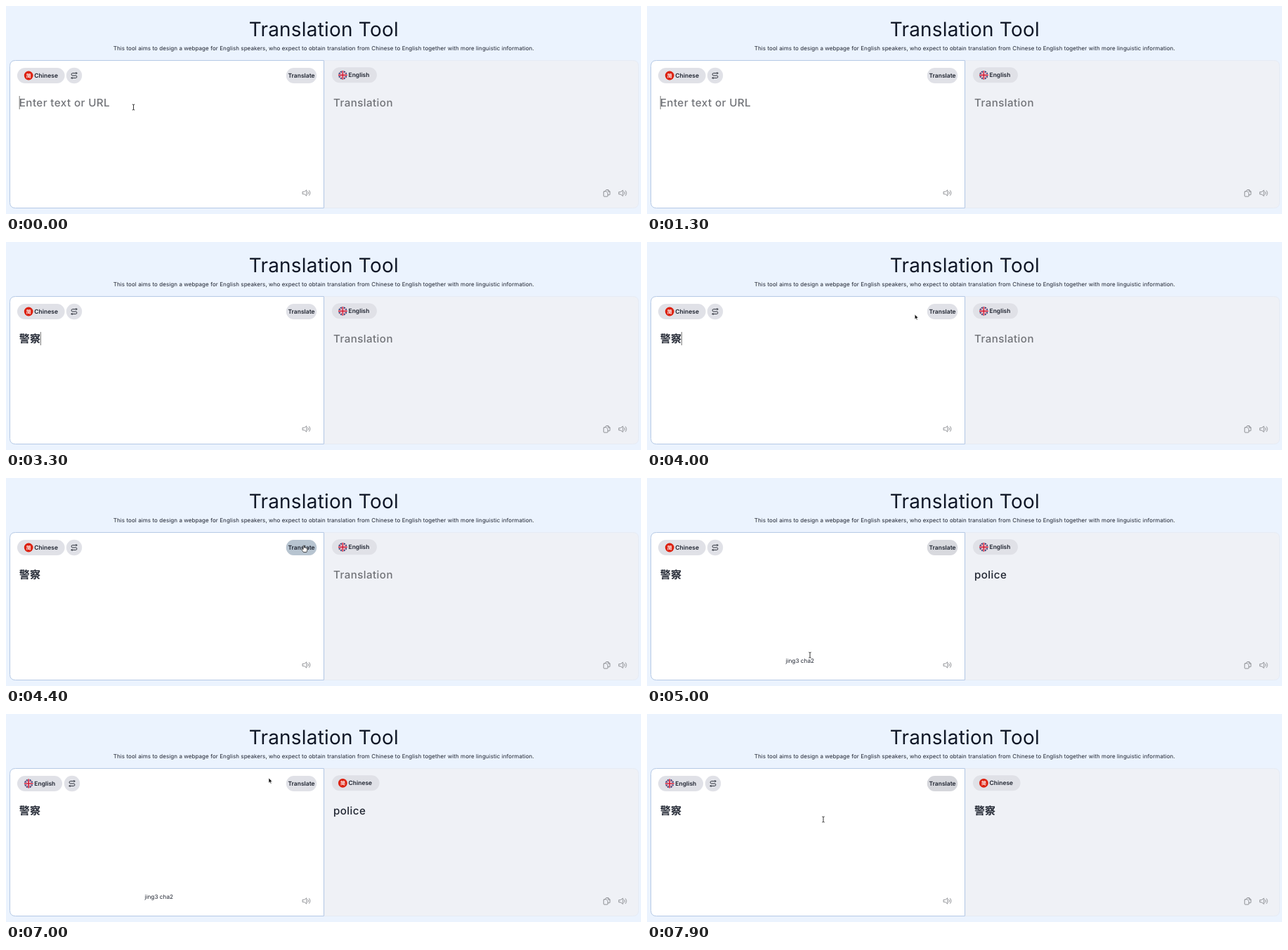
Write an HTML page that moves like this. It is 904x296 px and loops after 8 s.

```html
<!DOCTYPE html>
<html lang="en">
<head>
<meta charset="utf-8">
<title>Translation Tool</title>
<style>
  html, body { margin: 0; width: 100%; height: 100%; overflow: hidden; background: #ebf3fe; }
  svg { display: block; width: 100%; height: 100%; }
  text {
    font-family: Inter, "Noto Sans CJK SC", "Noto Sans CJK", sans-serif;
    font-optical-sizing: none;
    text-rendering: geometricPrecision;
    white-space: pre;
    fill: #1f2430;
  }
  .title { font-size: 28px; letter-spacing: .2px; text-anchor: middle; fill: #111827; }
  .sub { font-size: 8px; letter-spacing: .075px; text-anchor: middle; }
  .btn { font-size: 8.5px; font-weight: 600; }
  .field { font-size: 15.2px; font-weight: 500; letter-spacing: .4px; }
  .field.han { font-size: 15px; font-weight: 600; letter-spacing: .1px; }
  .field.hint { fill: #717378; }
  .pinyin { font-size: 8.2px; letter-spacing: .04px; }
  .cand { font-size: 8.2px; }
  .num { font-size: 6.3px; fill: #777; }
  .on { fill: #fff; }
  .pill { fill: #e0e1e7; }
  .line { fill: none; stroke: #85878c; stroke-width: .9; stroke-linecap: round; stroke-linejoin: round; }
</style>
</head>
<body>
<svg viewBox="0 0 904 296" xmlns="http://www.w3.org/2000/svg">
  <defs>
    <clipPath id="round"><circle r="6.4"/></clipPath>
    <filter id="shade" x="-10%" y="-80%" width="120%" height="300%">
      <feDropShadow dx="0" dy="2" stdDeviation="2.8" flood-color="#000" flood-opacity=".35"/>
    </filter>
    <g id="English">
      <g clip-path="url(#round)">
        <circle r="6.4" fill="#1d2b6b"/>
        <path d="M-6-6 6 6M6-6-6 6" stroke="#fff" stroke-width="1.7"/>
        <path d="M-6-6 6 6M6-6-6 6" stroke="#cf1b35" stroke-width=".7"/>
        <path d="M0-7V7M-7 0H7" stroke="#fff" stroke-width="3"/>
        <path d="M0-7V7M-7 0H7" stroke="#cf1b35" stroke-width="1.7"/>
      </g>
      <text class="btn" x="8.1" y="3">English</text>
    </g>
    <g id="Chinese">
      <circle r="6.4" fill="#dc2110"/>
      <text x="0" y="2.6" text-anchor="middle" style="font-size:7px;font-weight:700;fill:#fff">简</text>
      <text class="btn" x="8.1" y="3">Chinese</text>
    </g>
    <g id="speaker" class="line">
      <path d="M-5-1.6h2.2L.4-4.2V4.2L-2.8 1.6H-5zM2.4-1.8a2.6 2.6 0 0 1 0 3.6M4.1-3.5a5 5 0 0 1 0 7"/>
    </g>
    <g id="ibeam" fill="none">
      <path d="M-1.7-4Q0-4 0-3V3Q0 4-1.7 4M1.7-4Q0-4 0-3M0 3Q0 4 1.7 4" stroke="#fff" stroke-width="1.8" opacity=".7"/>
      <path d="M-1.7-4Q0-4 0-3V3Q0 4-1.7 4M1.7-4Q0-4 0-3M0 3Q0 4 1.7 4" stroke="#222" stroke-width=".9"/>
    </g>
    <path id="arrow" d="M0 0V7.2L1.7 5.7 2.8 8.2 4 7.7 2.9 5.2H5.1Z" fill="#111" stroke="#fff" stroke-width=".6"/>
    <path id="hand" d="M-.9 5V.8a.8.8 0 0 1 1.6 0V3.2q1-.5 1.5.2 1-.3 1.4.4 1.2-.1 1.2 1V6.8Q4.6 8.1 3.8 9.6H-.5Q-1.4 8.2-3 6.2-3.5 5.2-2.5 4.9-1.8 4.8-.9 5.8Z"
      fill="#fff" stroke="#222" stroke-width=".8" stroke-linejoin="round"/>
  </defs>

  <rect width="904" height="296" fill="#ebf3fe"/>
  <text class="title" x="452.3" y="43.3">Translation Tool</text>
  <text class="sub" x="452.3" y="63">This tool aims to design a webpage for English speakers, who expect to obtain translation from Chinese to English together with more linguistic information.</text>

  <path d="M453 77.5H892.5q8 0 8 8V279.5q0 8-8 8H453Z" fill="#eff1f6" stroke="#e6ebf4"/>
  <path d="M452.5 77.5H13.5q-8 0-8 8V279.5q0 8 8 8H452.5Z" fill="#fff" stroke="#b5c9e5"/>

  <rect class="pill" id="leftPill" x="16" y="88" height="22" rx="11"/>
  <use id="leftLang" x="32.2" y="99"/>
  <rect class="pill" id="rightPill" x="464" y="87.3" height="22" rx="11"/>
  <use id="rightLang" x="479.4" y="98.3"/>

  <g id="swap">
    <circle class="pill" r="11.2"/>
    <circle id="swapTint" r="11.2" fill="#cdced2"/>
    <path d="M4-3.4H-2.2a1.7 1.7 0 0 0 0 3.4H2.2a1.7 1.7 0 0 1 0 3.4H-4M2.8-4.6 4-3.4 2.8-2.2M-2.8 2.2-4 3.4-2.8 4.6"
      class="line" style="stroke:#30343e;stroke-width:1"/>
  </g>
  <rect class="pill" x="398.8" y="88" width="43.4" height="22" rx="11"/>
  <rect id="goTint" x="398.8" y="88" width="43.4" height="22" rx="11"/>
  <text class="btn" x="420.5" y="102.1" text-anchor="middle">Translate</text>

  <text id="input" x="18.8" y="143"></text>
  <path id="under" d="" stroke="#333" stroke-width="1"/>
  <rect id="caret" y="128" width="1" height="19" fill="#777"/>
  <text id="output" x="466" y="142.5"></text>
  <text class="pinyin" id="pinyin" x="197.4" y="263.4">jing3 cha2</text>

  <use href="#speaker" x="427.5" y="266"/>
  <use href="#speaker" x="877.8" y="266.3"/>
  <path class="line" d="M853.8 263.6V262.4q0-.8.8-.8H857.4L859.8 264V268q0 .8-.8.8H857.2M857.2 261.8V264.2H859.6M851.6 263.8H854.4L856.8 266.2V270.3q0 .8-.8.8H851.6q-.8 0-.8-.8V264.6q0-.8.8-.8Z"/>

  <g id="popup">
    <rect x="10" y="149.8" width="207.3" height="15.2" rx="2.5" fill="#fff" filter="url(#shade)"/>
    <rect id="pick" x="11.7" y="150.7" height="13.4" rx="2" fill="#0b55d3"/>
    <g id="cands"></g>
    <path class="line" d="M206.6 156.2 209 158.6 211.4 156.2"/>
  </g>
  <use id="cursor"/>
</svg>

<script>
const LOOP = 8000, STEP = 100;
const $ = id => document.getElementById(id);
const show = (el, on) => el.setAttribute('display', on ? 'inline' : 'none');
const set = (el, attrs) => { for (const k in attrs) el.setAttribute(k, attrs[k]); };

// Typed text with its candidate list, by start time
const typing = [
  [0, ''], [1500, 'j'],
  [1700, 'j', '就 及 将 既 家 级 讲 京 句'],
  [1800, 'ji', '及 级 既 几 即 计 机 记 鸡'],
  [2000, 'jin', '进 仅 尽 近 今 金 紧 斤 禁'],
  [2300, 'jing', '经 净 静 京 精 景 竟 劲 惊'],
  [2500, 'jing c', '经常 精彩 警察 京城 竞猜 景'],
  [2700, 'jing ch', '经常 警察 京城 精虫 净 静'],
  [2800, 'jing cha', '警察 经查 精茶 景 净 静'],
  [2900, '警察']
];

// Pointer hot spot: time, x, y
const path = [
  [0, 181.5, 144], [100, 181.5, 144], [900, 150, 140], [3400, 150, 140],
  [4200, 424, 96], [4500, 424, 96], [5000, 232, 252], [5400, 172, 118],
  [5800, 92, 98], [6500, 91, 98], [7000, 374, 91], [7300, 421, 97],
  [7500, 421, 97], [7900, 251, 150], [LOOP, 251, 150]
];

const smooth = u => u * u * (3 - 2 * u);

function pointer(t) {
  const i = path.findIndex(p => p[0] > t);
  const [t0, x0, y0] = path[i - 1], [t1, x1, y1] = path[i];
  const u = smooth((t - t0) / (t1 - t0));
  return [x0 + (x1 - x0) * u, y0 + (y1 - y0) * u];
}

function write(el, text, hint) {
  const kind = hint ? 'hint' : /[\u4e00-\u9fff]/.test(text) ? 'han' : '';
  el.setAttribute('class', 'field ' + kind);
  el.textContent = text;
}

function listCandidates(words) {
  let x = 13.2;
  $('cands').innerHTML = words.split(' ').map((word, i) => {
    const on = i ? '' : ' on';
    const item = `<text class="num${on}" x="${x}" y="159.8">${i + 1}</text>` +
      `<text class="cand${on}" x="${x + 5.6}" y="160.4">${word}</text>`;
    x += 12.4 + 8.2 * word.length;
    return item;
  }).join('');
  $('pick').setAttribute('width', 10.2 + 8.2 * words.indexOf(' '));
}

function setLang(side, lang) {
  $(side + 'Lang').setAttribute('href', '#' + lang);
  $(side + 'Pill').setAttribute('width', lang === 'Chinese' ? 67.6 : 64);
}

function draw(t) {
  const [, text, words] = typing.filter(s => s[0] <= t).pop();
  write($('input'), text || 'Enter text or URL', !text);
  const width = text ? $('input').getComputedTextLength() : 0;
  $('caret').setAttribute('x', 18.7 + width);
  show($('caret'), t < 4300);
  const composing = text && t < 2900;
  $('under').setAttribute('d', composing ? `M19 146.3H${18.8 + width}` : '');
  show($('popup'), words);
  if (words) listCandidates(words);

  const done = t >= 4600, redone = t >= 7500;
  write($('output'), redone ? '警察' : done ? 'police' : 'Translation', !done);
  show($('pinyin'), done && !redone);

  const swapped = t >= 6300;
  setLang('left', swapped ? 'English' : 'Chinese');
  setLang('right', swapped ? 'Chinese' : 'English');
  const swapX = swapped ? 94 : 97;
  $('swap').setAttribute('transform', `translate(${swapX} 99)`);

  const [x, y] = pointer(t);
  const visible = t < 1300 || t >= 3400;
  const overSwap = visible && Math.hypot(x - swapX, y - 99) < 11;
  const overGo = visible && x > 399 && x < 442 && y > 88 && y < 110;
  const pressed = (t >= 4300 && t < 4500) || (t >= 7300 && t < 7500);
  const released = t >= 7500 ? 7500 : 4500;
  const fade = t < released ? 0 : Math.max(0, 1 - (t - released) / 900);
  $('swapTint').setAttribute('opacity', overSwap ? 1 : 0);
  set($('goTint'), {
    fill: pressed ? '#b7c4d0' : '#cdced2',
    opacity: overGo || pressed ? 1 : fade
  });

  const overLang = y > 88 && y < 110 && x > 16 && x < 84;
  const shape = overSwap || overGo || overLang ? 'hand' : y > 116 ? 'ibeam' : 'arrow';
  set($('cursor'), { href: '#' + shape, x, y });
  show($('cursor'), visible);
}

let last = -1;
function tick() {
  const t = Math.floor(performance.now() % LOOP / STEP) * STEP;
  if (t !== last) draw(last = t);
  requestAnimationFrame(tick);
}
tick();
</script>
</body>
</html>
```
